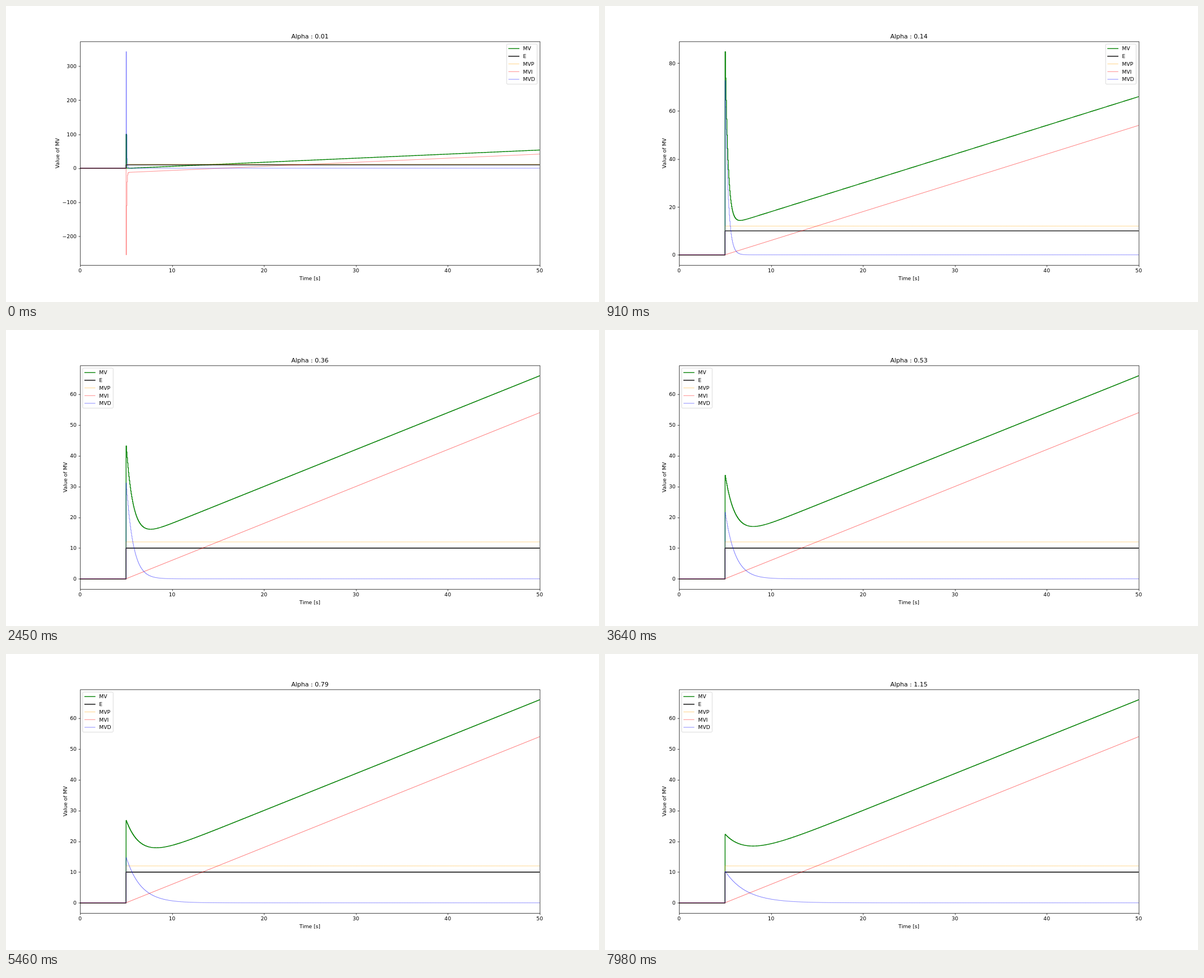
An HTML page for the animation above (8000 ms loop, 1058 px wide and 529 px high).

```html
<!DOCTYPE html>
<html lang="en">
<head>
<meta charset="utf-8">
<title>PID response by alpha</title>
<style>
  html, body { margin: 0; width: 100%; height: 100%; overflow: hidden; background: #fff; }
  svg { display: block; width: 1058px; height: 529px; }
  text { font: 10px "DejaVu Sans", sans-serif; fill: #000; }
  .title { font-size: 12px; }
  .mid { text-anchor: middle; }
  .end { text-anchor: end; }
  .axis { fill: none; stroke: #000; stroke-width: .8; }
  .line { fill: none; stroke-linejoin: round; stroke-linecap: square; }
</style>
</head>
<body>
<svg viewBox="0 0 1152 576">
  <clipPath id="area"><rect x="144" y="69.12" width="892.8" height="434.88"/></clipPath>
  <g id="curves" clip-path="url(#area)"></g>
  <path id="xticks" class="axis"/>
  <path id="yticks" class="axis"/>
  <rect class="axis" x="144.5" y="69.5" width="893" height="435"/>
  <g id="xlabels"></g>
  <g id="ylabels"></g>
  <text class="mid" x="590.4" y="533.6">Time [s]</text>
  <text class="mid" id="ytitle">Value of MV</text>
  <text class="mid title" id="title" x="590.4" y="63"></text>
  <g id="legend">
    <rect x="0" y="74.1" width="59.2" height="78" rx="2" fill="#fff" fill-opacity=".8" stroke="#ccc" stroke-opacity=".8"/>
  </g>
</svg>
<script>
const LEFT = 144, RIGHT = 1036.8, TOP = 69.12, BOTTOM = 504;
const LOOP = 8000, STEP_MS = 70;
const END = 50, TS = 0.05, STEP_AT = 5, COUNT = END / TS + 1;
const GAIN = 1.2, TI = 10, TD = 2, MV_MIN = 0, MV_MAX = 100;
const SERIES = [
  ['MV', 'green', 1.5],
  ['E', 'black', 1.5],
  ['MVP', 'orange', 0.5],
  ['MVI', 'red', 0.5],
  ['MVD', 'blue', 0.5]
];

const $ = id => document.getElementById(id);
const px = t => LEFT + t / END * (RIGHT - LEFT);
const snap = v => Math.floor(v + 0.5) + 0.5;

function add(parent, tag, attrs, text = '') {
  const el = document.createElementNS('http://www.w3.org/2000/svg', tag);
  for (const key in attrs) el.setAttribute(key, attrs[key]);
  el.textContent = text;
  return parent.appendChild(el);
}

// Discrete PID with filtered derivative and integral reset on saturation
function simulate(alpha) {
  const out = { MV: [], E: [], MVP: [], MVI: [], MVD: [] };
  const tf = alpha * TD;
  let last = 0, i = 0, d = 0;
  for (let n = 0; n < COUNT; n++) {
    const e = n >= STEP_AT / TS ? 10 : 0;
    const p = GAIN * e;
    i += GAIN * TS / TI * e;
    d = (tf * d + GAIN * TD * (e - last)) / (tf + TS);
    last = e;
    const mv = Math.min(MV_MAX, Math.max(MV_MIN, p + i + d));
    if (mv !== p + i + d) i = mv - p - d;
    out.MV.push(mv);
    out.E.push(e);
    out.MVP.push(p);
    out.MVI.push(i);
    out.MVD.push(d);
  }
  return out;
}

function tickStep(range) {
  const raw = range / 9;
  const mag = 10 ** Math.floor(Math.log10(raw));
  return mag * [1, 2, 2.5, 5, 10].find(s => s * mag >= raw);
}

function stairs(values, py) {
  let d = `M${LEFT} ${py(values[0]).toFixed(2)}`;
  for (let n = 1; n < values.length; n++) {
    d += `H${px(n * TS).toFixed(2)}`;
    if (values[n] !== values[n - 1]) d += `V${py(values[n]).toFixed(2)}`;
  }
  return d;
}

function drawYAxis(lo, hi, py) {
  const step = tickStep(hi - lo);
  let marks = '', widest = 0;
  $('ylabels').textContent = '';
  for (let k = Math.ceil(lo / step); k * step <= hi; k++) {
    const v = k * step, y = py(v);
    marks += `M144.5 ${snap(y)}h-3.5`;
    const label = String(v).replace('-', '\u2212');
    add($('ylabels'), 'text', { class: 'end', x: 137, y: y + 3.8 }, label);
    widest = Math.max(widest, String(Math.abs(v)).length * 6.36 + (v < 0 ? 8.38 : 0));
  }
  $('yticks').setAttribute('d', marks);
  $('ytitle').setAttribute('transform', `translate(${137 - widest - 6.1} 286.6) rotate(-90)`);
}

function draw(index) {
  const alpha = (index + 1) / 100;
  const data = simulate(alpha);
  const all = Object.values(data).flat();
  const min = Math.min(...all), max = Math.max(...all);
  const pad = (max - min) * 0.05, lo = min - pad, hi = max + pad;
  const py = v => BOTTOM - (v - lo) / (hi - lo) * (BOTTOM - TOP);

  SERIES.forEach(([name], n) => curves[n].setAttribute('d', stairs(data[name], py)));
  drawYAxis(lo, hi, py);
  $('title').textContent = 'Alpha : ' + (alpha % 1 ? alpha : alpha.toFixed(1));
  // The legend moves left when the MV line would run through it
  const blocked = py(data.MV[Math.round(49.7 / TS)]) < 152.1;
  $('legend').setAttribute('transform', `translate(${blocked ? 149 : 972.6} 0)`);
}

const curves = SERIES.map(([, stroke, width], n) => {
  const style = { class: 'line', stroke, 'stroke-width': width };
  const y = 82.8 + n * 14.96;
  add($('legend'), 'path', { ...style, d: `M4 ${y}h20` });
  add($('legend'), 'text', { x: 32, y: y + 3.7 }, SERIES[n][0]);
  return add($('curves'), 'path', style);
});

let xmarks = '';
for (let t = 0; t <= END; t += 10) {
  xmarks += `M${snap(px(t))} 504.5v3.5`;
  add($('xlabels'), 'text', { class: 'mid', x: px(t), y: 518.8 }, t);
}
$('xticks').setAttribute('d', xmarks);

let shown = -1;
function tick() {
  const index = Math.floor(performance.now() % LOOP / STEP_MS);
  if (index !== shown) draw(shown = index);
  requestAnimationFrame(tick);
}
tick();
</script>
</body>
</html>
```
